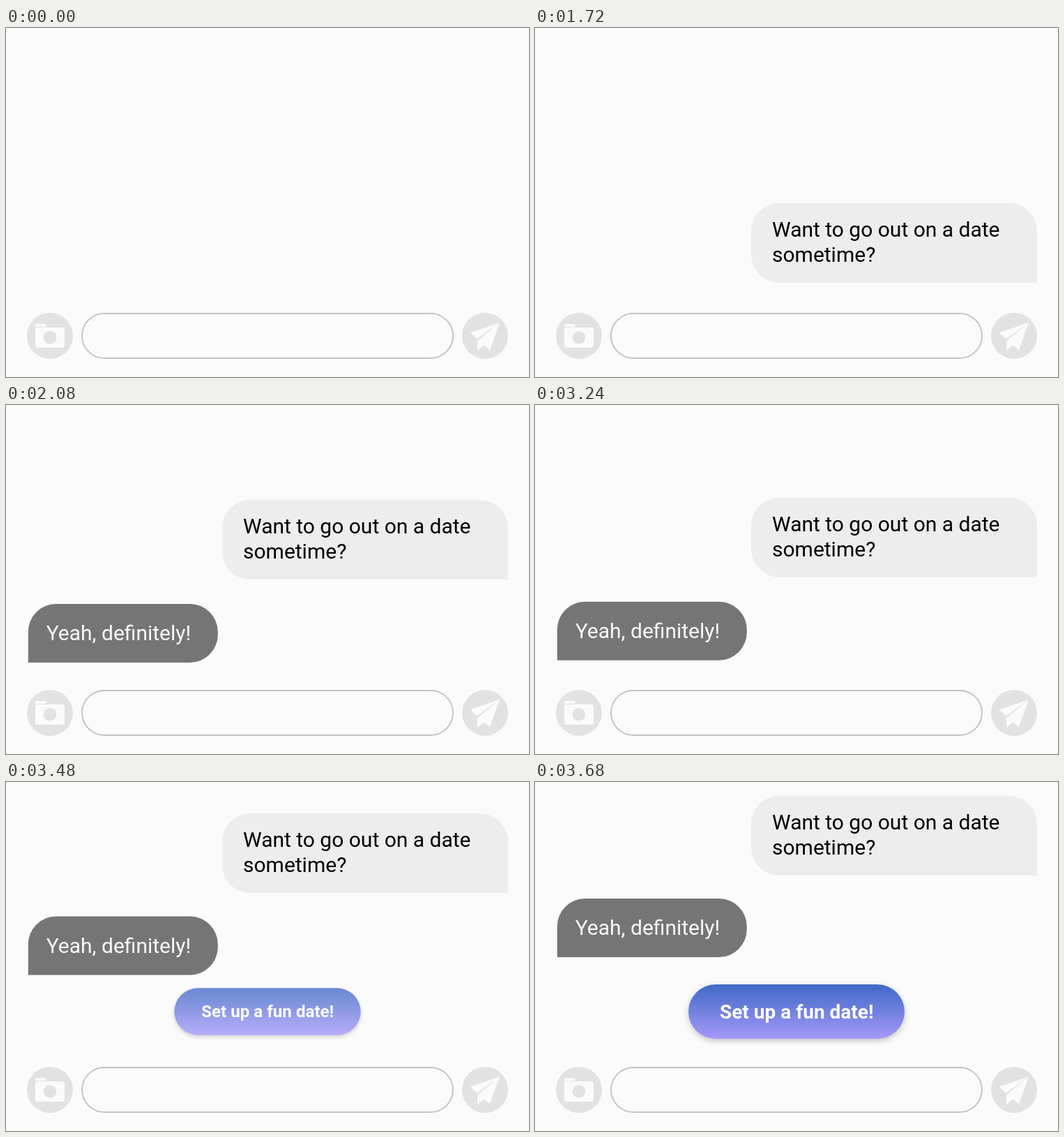
Recreate the animation shown at these times as an HTML page. Size 750 by 500 pixels, loop 5.6 s.

```html
<!DOCTYPE html>
<html lang="en">
<head>
<meta charset="utf-8">
<title>Chat</title>
<style>
  html, body { margin: 0; height: 100%; overflow: hidden; background: #fbfbfb; }
  svg { display: block; width: 750px; height: 500px; }
  text { font-family: Roboto, sans-serif; font-size: 30px; }
  .label { font-size: 28px; font-weight: 700; fill: #fff; }
  .pill { filter: drop-shadow(0 3px 4px rgba(0, 0, 0, .22)); }
  .disc { fill: #e2e2e2; }
  .icon { fill: #fbfbfb; }
</style>
</head>
<body>
<svg viewBox="0 0 750 500">
  <defs>
    <linearGradient id="blue" x2="0" y2="1">
      <stop stop-color="#4069c6"/>
      <stop offset="1" stop-color="#a599f8"/>
    </linearGradient>
  </defs>

  <g id="question" opacity="0">
    <path fill="#ededed" d="M350 254H680A40 40 0 0 1 720 294V368H350A40 40 0 0 1 310 328V294A40 40 0 0 1 350 254Z"/>
    <text x="340" y="302">Want to go out on a date</text>
    <text x="340" y="338">sometime?</text>
  </g>

  <!-- drawn from its bottom left corner, where it grows -->
  <g id="answer" opacity="0">
    <path fill="#757575" d="M0 0V-44A40 40 0 0 1 40 -84H232A40 40 0 0 1 272 -44V-40A40 40 0 0 1 232 0Z"/>
    <text x="26" y="-31.7" fill="#fbfbfb">Yeah, definitely!</text>
  </g>

  <!-- drawn around its centre -->
  <g id="button" opacity="0">
    <rect class="pill" x="-155" y="-39" width="310" height="78" rx="39" fill="url(#blue)"/>
    <text class="label" x="-110" y="9.5">Set up a fun date!</text>
  </g>

  <rect x="109" y="409" width="532" height="64" rx="32" fill="none" stroke="#c3c3c3" stroke-width="2"/>

  <circle class="disc" cx="63" cy="441" r="33"/>
  <rect class="icon" x="42" y="424" width="15.5" height="4" rx="1.5"/>
  <rect class="icon" x="42" y="429" width="42" height="29" rx="3"/>
  <circle class="disc" cx="63" cy="443.3" r="9.3"/>

  <circle class="disc" cx="687" cy="441" r="33"/>
  <path class="icon" d="M666 436.5L708 422L675.5 445.5ZM708 422L694 461L685 454.5L676 462.5V448.5Z"/>
</svg>
<script>
  const LOOP = 5600, STEP = 40;
  const [question, answer, button] = ["question", "answer", "button"].map(id => document.getElementById(id));

  // Eased progress from 0 to 1 between two times
  function ease(t, from, to) {
    const p = Math.min(1, Math.max(0, (t - from) / (to - from)));
    return p * p * (3 - 2 * p);
  }

  function place(el, x, y, scale, opacity) {
    el.setAttribute("transform", `translate(${x} ${y}) scale(${scale})`);
    el.setAttribute("opacity", opacity);
  }

  function draw(t) {
    const sent = ease(t, 200, 400);
    const reply = ease(t, 1680, 2080);
    const offer = ease(t, 3200, 3600);
    const settle = ease(t, 3600, 3680);

    place(question, 0, 80 * (1 - sent) - 118 * reply - 116 * offer, 1, sent);
    place(answer, 31.8, 369 - 118 * reply * offer, reply, reply);
    place(button, 375, 329, 1.1 * offer - 0.1 * settle, offer);
  }

  const start = performance.now();
  function tick() {
    const t = (performance.now() - start) % LOOP;
    draw(Math.floor(t / STEP) * STEP);
    requestAnimationFrame(tick);
  }
  tick();
</script>
</body>
</html>
```
